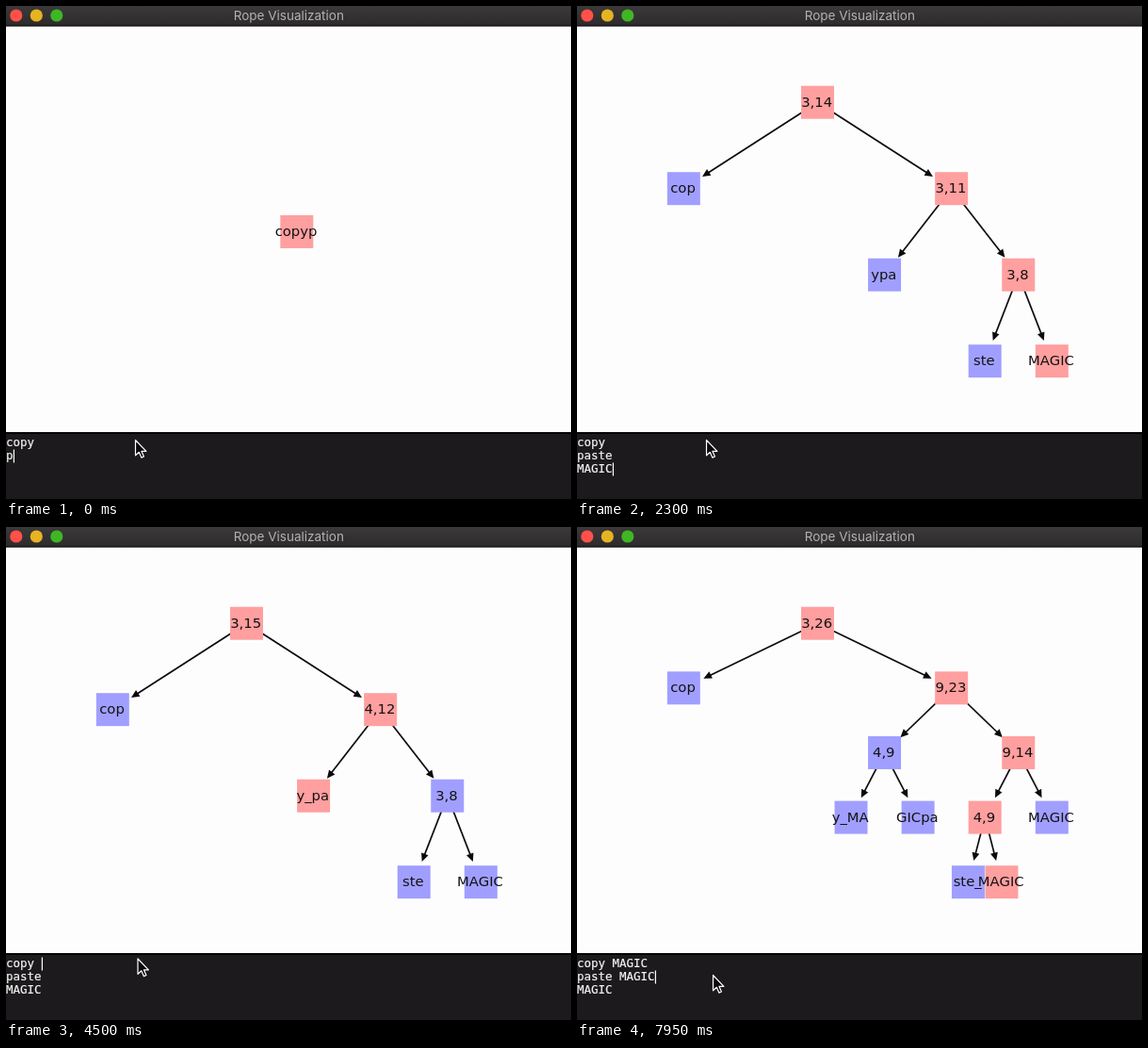
These frames come from a looping animation (600 px wide and 523 px high, 8000 ms). An HTML page:

```html
<!DOCTYPE html>
<html lang="en">
<head>
<meta charset="utf-8">
<title>Rope Visualization</title>
<style>
  html, body { margin: 0; width: 100%; height: 100%; overflow: hidden; background: #fefdfe; }
  svg { display: block; width: 100vw; height: 100vh; }
  .title { font: 13.5px Inter, Roboto, sans-serif; fill: #b3b1b2; text-anchor: middle; }
  .label { font: 14.8px "DejaVu Sans", sans-serif; fill: #141214; text-anchor: middle; }
  .code { font: 12.46px "DejaVu Sans Mono", monospace; fill: #f4f4f4; stroke: #f4f4f4; stroke-width: .2; white-space: pre; }
  .edge { stroke: #0c0a0c; stroke-width: 1.7; }
  .head { fill: #0c0a0c; }
</style>
</head>
<body>
<svg viewBox="0 0 600 523">
  <defs>
    <linearGradient id="bar" x2="0" y2="1">
      <stop offset="0" stop-color="#3c393b"/>
      <stop offset="1" stop-color="#2d2a2c"/>
    </linearGradient>
  </defs>
  <rect width="600" height="523" fill="#fefdfe"/>
  <rect width="600" height="21" fill="url(#bar)"/>
  <rect y="20.5" width="600" height="1.2" fill="#0d0b0d"/>
  <circle cx="10.8" cy="10" r="6.6" fill="#ff5149"/>
  <circle cx="32.3" cy="10" r="6.6" fill="#e6b422"/>
  <circle cx="53.8" cy="10" r="6.6" fill="#3fb624"/>
  <text class="title" x="300.3" y="15">Rope Visualization</text>
  <g id="tree"></g>
  <rect y="452" width="600" height="71" fill="#1c1a1c"/>
  <rect y="452" width="600" height="2" fill="#050405"/>
  <rect id="selection" y="484.5" width="37.5" height="14" fill="#41648f"/>
  <g id="editor"></g>
  <rect id="caret" width="1.2" height="14" fill="#fff"/>
  <path id="mouse" d="M0 0V16.3L3.8 12.8L6.3 18.6L8.9 17.5L6.4 11.8H11.4Z"
        fill="#080808" stroke="#fff" stroke-width="1.2" stroke-linejoin="round"/>
</svg>
<script>
const LOOP = 8000;
const SIDE = 35, CHAR = 7.5, LINE = 14;
const LEFT = 113.3, RIGHT = 504.3, TOP = 102.2, BOTTOM = 376.7;
const $ = id => document.getElementById(id);

// "*" marks the leaf touched last, "|" marks the caret.
const pasted = ["y_MA", "GICpa"];
const states = [
  [0, "copy\np|", "*copyp"],
  [250, "copy\npa|", ["cop", "*ypa"]],
  [600, "copy\npas|", ["cop", "*ypas"]],
  [950, "copy\npast|", ["cop", "*ypast"]],
  [1200, "copy\npaste|", ["cop", ["ypa", "*ste"]]],
  [1350, "copy\npaste\n|", ["cop", ["ypa", "*ste"]]],
  [1500, "copy\npaste\nM|", ["cop", ["ypa", "*steM"]]],
  [1700, "copy\npaste\nMA|", ["cop", ["ypa", "*steMA"]]],
  [1850, "copy\npaste\nMAG|", ["cop", ["ypa", ["ste", "*MAG"]]]],
  [2000, "copy\npaste\nMAGI|", ["cop", ["ypa", ["ste", "*MAGI"]]]],
  [2150, "copy\npaste\nMAGIC|", ["cop", ["ypa", ["ste", "*MAGIC"]]]],
  [3200, "copy\npaste\nMAGIC", ["cop", ["ypa", ["*ste", "MAGIC"]]], true],
  [4100, "copy|\npaste\nMAGIC", ["cop", ["*ypa", ["ste", "MAGIC"]]]],
  [4500, "copy |\npaste\nMAGIC", ["cop", ["*y_pa", ["ste", "MAGIC"]]]],
  [4800, "copy MAGIC|\npaste\nMAGIC", ["cop", [["y_MA", "*GICpa"], ["ste", "MAGIC"]]]],
  [6500, "copy MAGIC\npaste|\nMAGIC", ["cop", [pasted, ["*ste", "MAGIC"]]]],
  [6800, "copy MAGIC\npaste |\nMAGIC", ["cop", [pasted, ["*ste_", "MAGIC"]]]],
  [7400, "copy MAGIC\npaste MAGIC|\nMAGIC", ["cop", [pasted, [["ste_", "*MAGIC"], "MAGIC"]]]]
];

const mousePath = [
  [0, 137.5, 460.5], [2550, 137.5, 460.5], [2950, 45, 497], [3150, 28.5, 492.5],
  [3700, 28.5, 492.5], [4000, 140, 458], [4650, 140, 458], [4950, 146.5, 488],
  [6150, 146.5, 488], [6420, 144.5, 475.5], [LOOP, 144.5, 475.5]
];

const textOf = node => Array.isArray(node) ? node.map(textOf).join("") : node;
const lengthOf = node => textOf(node).replace("*", "").length;

// Each level halves the sideways step; the result is fitted to the plot area.
function layout(root) {
  const nodes = [], edges = [];
  function place(node, x, level, step) {
    const leaf = !Array.isArray(node);
    const item = {
      x, level,
      red: textOf(node).includes("*"),
      label: leaf ? node.replace("*", "") : lengthOf(node[0]) + "," + lengthOf(node)
    };
    nodes.push(item);
    if (!leaf) node.forEach((child, i) => {
      edges.push([item, place(child, x + (i ? step : -step), level + 1, step / 2)]);
    });
    return item;
  }
  place(root, 0, 0, 1);
  const fit = (key, lo, hi) => {
    const values = nodes.map(n => n[key]);
    const min = Math.min(...values), span = Math.max(...values) - min;
    return v => span ? lo + (v - min) / span * (hi - lo) : (lo + hi) / 2;
  };
  const fx = fit("x", LEFT, RIGHT), fy = fit("level", TOP, BOTTOM);
  nodes.forEach(n => { n.px = fx(n.x); n.py = fy(n.level); });
  return { nodes, edges };
}

function arrow([a, b]) {
  const dx = b.px - a.px, dy = b.py - a.py, d = Math.hypot(dx, dy);
  const ux = dx / d, uy = dy / d;
  const at = (back, side) => [b.px - ux * back - uy * side, b.py - uy * back + ux * side];
  const [ex, ey] = at(28, 0);
  return `<line class="edge" x1="${a.px}" y1="${a.py}" x2="${ex}" y2="${ey}"/>` +
    `<polygon class="head" points="${[at(23.4, 0), at(32, 4), at(32, -4)].join(" ")}"/>`;
}

const square = n => `<rect x="${n.px - SIDE / 2}" y="${n.py - SIDE / 2}" width="${SIDE}" height="${SIDE}" fill="${n.red ? "#ff9f9f" : "#a09fff"}"/>`;
const label = n => `<text class="label" x="${n.px - 0.8}" y="${n.py + 4.6}">${n.label}</text>`;

function drawState([, text, tree, selected]) {
  const { nodes, edges } = layout(tree);
  $("tree").innerHTML = edges.map(arrow).join("") + nodes.map(square).join("") + nodes.map(label).join("");
  const lines = text.split("\n");
  $("editor").innerHTML = lines.map((s, i) =>
    `<text class="code" x="0" y="${467 + i * LINE}">${s.replace("|", "")}</text>`).join("");
  const row = lines.findIndex(s => s.includes("|"));
  if (row >= 0) {
    $("caret").setAttribute("x", lines[row].indexOf("|") * CHAR + 0.3);
    $("caret").setAttribute("y", 456.5 + row * LINE);
  }
  $("selection").style.display = selected ? "" : "none";
}

function mouseAt(t) {
  const i = mousePath.findIndex(p => p[0] > t);
  const [t0, x0, y0] = mousePath[i - 1], [t1, x1, y1] = mousePath[i];
  const u = (t - t0) / (t1 - t0), k = u * u * (3 - 2 * u);
  return [x0 + (x1 - x0) * k, y0 + (y1 - y0) * k];
}

let shown;
function render(t) {
  const state = states.filter(s => s[0] <= t).pop();
  if (state !== shown) drawState(shown = state);
  const lit = state[1].includes("|") && (t - state[0]) % 900 < 600;
  $("caret").style.display = lit ? "" : "none";
  $("mouse").setAttribute("transform", `translate(${mouseAt(t)})`);
}

const start = performance.now();
function tick() {
  render((performance.now() - start) % LOOP);
  requestAnimationFrame(tick);
}
tick();
</script>
</body>
</html>
```
